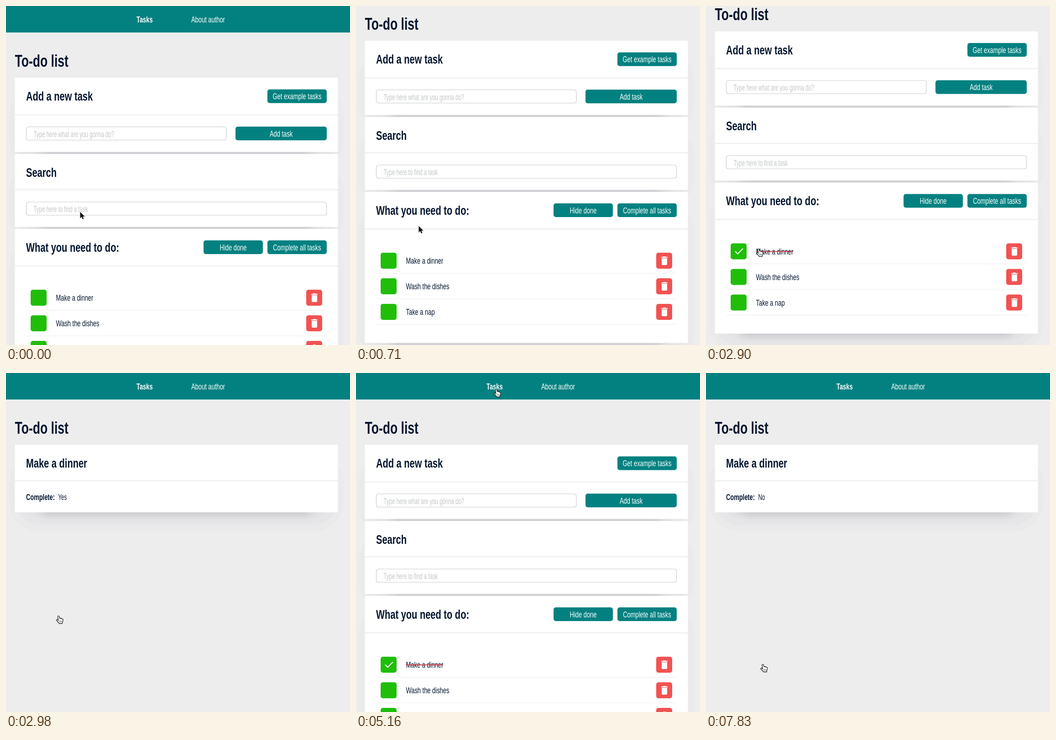
Write an HTML page with a canvas that moves like this. It is 754 by 742 pixels and loops after 8.66 s.

```html
<!DOCTYPE html>
<html lang="en">
<head>
<meta charset="utf-8">
<title>To-do list</title>
<style>
html, body { margin: 0; width: 100%; height: 100%; overflow: hidden; background: #ededed; }
canvas { display: block; }
</style>
</head>
<body>
<canvas id="stage" width="754" height="742"></canvas>
<script>
const ctx = document.getElementById('stage').getContext('2d');
const LOOP = 8660;
const TEAL = '#028180', NAVY = '#04152f', GREEN = '#20be0a', GREEN_HOVER = '#22d00a', RED = '#f25252';
const CONDENSED = 0.717, NARROW = 0.635;

// Each step: start time, then its values, held until the next step.
const scrollSteps = [[0, 0], [560, 20], [635, 57], [710, 81], [870, 93], [950, 101.5], [2980, 0]];
const viewSteps = [[0, 'list'], [2980, 'Yes'], [5160, 'list'], [7830, 'No']];
const doneSteps = [[0, 0], [1920, 0.5], [2010, 1], [6610, 0]];
const hoverSteps = [[0, false], [1520, true], [2740, false], [6610, true]];
const cursorSteps = [
  [0, 162, 450], [310, 137, 481], [1440, 98, 512], [1520, 70, 532, 'hand'],
  [2740, 84, 531, 'hand'], [2820, 104, 531, 'hand'], [2900, 110, 531, 'hand'],
  [3560, 117, 534], [3640, 128, 470], [3720, 125, 400], [3790, 112, 345],
  [3870, 104, 319], [4030, 104, 317], [4270, 131, 278], [4340, 289, 122],
  [4510, 297, 105], [4590, 301, 92], [4750, 304, 81], [4910, 307, 54],
  [5160, 302, 35, 'hand'], [5650, 292, 60], [5730, 297, 70], [5890, 200, 399],
  [6130, 177, 509], [6290, 166, 535], [6370, 153, 560],
  [6610, 70, 633, 'hand'], [6930, 70, 634, 'hand'], [7180, 80, 634, 'hand'],
  [7260, 103, 634, 'hand'], [7340, 119, 634, 'hand'], [7830, 119.5, 637, 'hand']
];
const cursors = {
  arrow: new Path2D('M.5 .5V14.6L3.7 11.6 5.8 16.6 8.3 15.5 6.2 10.7H10.6Z'),
  hand: new Path2D('M3.5 2.2C3.5.4 6 .2 6.5 2L7.6 6.2C8 5 10 5.1 10.3 6.6 11 5.6 12.7 6 12.8 7.4 13.8 6.8 15 7.6 15 9 15 12 14 13 13.4 15V17H6.5C6 15 3 13 1 10.6 0 9.2 1.6 8 3 9.2L5 11Z')
};

const stepAt = (steps, t) => steps.filter(step => step[0] <= t).pop().slice(1);

function text(str, x, baseline, { size = 18, bold = false, color = NAVY, align = 'left', scale = CONDENSED } = {}) {
  ctx.save();
  ctx.translate(x, baseline);
  ctx.scale(scale, 1);
  ctx.font = `${bold ? 'bold ' : ''}${size}px "Liberation Sans", Arial, sans-serif`;
  ctx.textAlign = align;
  ctx.fillStyle = color;
  ctx.fillText(str, 0, 0);
  const width = ctx.measureText(str).width * scale;
  ctx.restore();
  return width;
}

function rect(x, y, w, h, color) {
  ctx.fillStyle = color;
  ctx.fillRect(x, y, w, h);
}

function rounded(x, y, w, h, radius, color) {
  ctx.beginPath();
  ctx.roundRect(x, y, w, h, radius);
  ctx.fillStyle = color;
  ctx.fill();
}

const heading = (str, baseline) => text(str, 44, baseline, { size: 28, bold: true });

function button(label, x, y, w) {
  rounded(x, y, w, 30, 5, TEAL);
  text(label, x + w / 2, y + 21.7, { color: '#fff', align: 'center' });
}

function input(placeholder, y, w) {
  ctx.beginPath();
  ctx.roundRect(44.5, y + 0.5, w, 29, 5);
  ctx.strokeStyle = '#ccc';
  ctx.lineWidth = 1.2;
  ctx.stroke();
  text(placeholder, 60.5, y + 22.5, { color: '#c3c6c8', scale: NARROW });
}

// Soft edge built from nested translucent layers with bell-shaped weights.
function softRect(x, y, w, h, reach, rgb, alpha, layers) {
  for (let i = 0; i < layers; i++) {
    const u = 1 - 2 * (i + 0.5) / layers, grow = reach * u;
    const weight = alpha / layers * (1 + Math.cos(Math.PI * u));
    rounded(x - grow, y - grow, w + 2 * grow, h + 2 * grow, reach + grow, `rgba(${rgb},${weight})`);
  }
}

function card(top, bottom, divider) {
  const height = bottom - top;
  softRect(29, top + 40, 689, height - 20, 45, '50,50,93', 0.06, 6);
  softRect(70, top + 50, 607, height - 50, 30, '20,20,50', 0.21, 20);
  rect(19.5, top, 708, height, '#fff');
  rect(19.5, divider - 1, 708, 2, '#ececec');
}

function tick(y) {
  ctx.beginPath();
  ctx.moveTo(64, y + 17.5);
  ctx.lineTo(69.5, y + 23);
  ctx.lineTo(81, y + 11.5);
  ctx.strokeStyle = '#fff';
  ctx.lineWidth = 2;
  ctx.stroke();
}

function trash(y) {
  rounded(658, y, 35, 35, 5, RED);
  rect(669, y + 9, 14, 2, '#fff');
  rect(673, y + 8, 6, 2, '#fff');
  rounded(670, y + 12, 12, 15, [0, 0, 2, 2], '#fff');
}

function taskRow(name, index, done = 0, hover = false) {
  const y = 621 + 56 * index;
  rounded(54, y, 35, 35, 5, hover ? GREEN_HOVER : GREEN);
  const width = text(name, 109.5, y + 24.3);
  if (done) {
    ctx.globalAlpha = done;
    tick(y);
    rect(109.5, y + 17, width, 1.7, '#d5303a');
    ctx.globalAlpha = 1;
  }
  trash(y);
  rect(44, y + 44.5, 659, 1, '#ebebeb');
}

function pageTop() {
  rect(0, 0, 754, 58, TEAL);
  text('Tasks', 286, 36.3, { bold: true, color: '#fff' });
  text('About author', 406, 36.3, { color: '#fff' });
  text('To-do list', 19.5, 132.5, { size: 37, bold: true });
}

function listView(done, hover) {
  card(157, 319.5, 238.3);
  heading('Add a new task', 207);
  button('Get example tasks', 573, 182.5, 130);
  input('Type here what are you gonna do?', 264, 438.5);
  button('Add task', 503, 264, 200);

  card(324, 483.5, 402.3);
  heading('Search', 373.5);
  input('Type here to find a task', 428.5, 658);

  card(488, 818.5, 569);
  heading('What you need to do:', 537.5);
  button('Hide done', 433, 513, 130);
  button('Complete all tasks', 573, 513, 130);

  taskRow('Make a dinner', 0, done, hover);
  taskRow('Wash the dishes', 1);
  taskRow('Take a nap', 2);
}

function taskView(complete) {
  card(157, 305, 236);
  heading('Make a dinner', 207);
  text('Complete:', 44, 277.5, { bold: true });
  text(complete, 114.5, 277.5, { scale: NARROW });
}

function drawCursor(x, y, kind = 'arrow') {
  const shape = cursors[kind], isArrow = kind === 'arrow';
  ctx.save();
  ctx.lineJoin = 'round';
  ctx.lineWidth = 2;
  ctx.strokeStyle = 'rgba(0,0,0,.15)';
  ctx.translate(x, y + 1);
  ctx.stroke(shape);
  ctx.translate(0, -1);
  ctx.lineWidth = isArrow ? 1.6 : 1.1;
  ctx.strokeStyle = isArrow ? '#fff' : '#222';
  ctx.fillStyle = isArrow ? '#111' : '#fff';
  ctx.stroke(shape);
  ctx.fill(shape);
  if (!isArrow) {
    ctx.stroke(shape);
    ctx.lineWidth = 0.7;
    for (const lineX of [7.5, 9.5, 11.5]) {
      ctx.beginPath();
      ctx.moveTo(lineX, 11);
      ctx.lineTo(lineX, 14.5);
      ctx.stroke();
    }
  }
  ctx.restore();
}

function draw([scroll, view, done, hover, cursor]) {
  rect(0, 0, 754, 742, '#ededed');
  ctx.save();
  ctx.translate(0, -scroll);
  pageTop();
  if (view === 'list') listView(done, hover);
  else taskView(view);
  ctx.restore();
  drawCursor(...cursor);
}

let shown = '';
function tick60() {
  const t = performance.now() % LOOP;
  const [[scroll], [view], [done], [hover], cursor] =
    [scrollSteps, viewSteps, doneSteps, hoverSteps, cursorSteps].map(steps => stepAt(steps, t));
  const state = [scroll, view, done, hover, cursor], key = state.join();
  if (key !== shown) {
    draw(state);
    shown = key;
  }
  requestAnimationFrame(tick60);
}
tick60();
</script>
</body>
</html>
```
